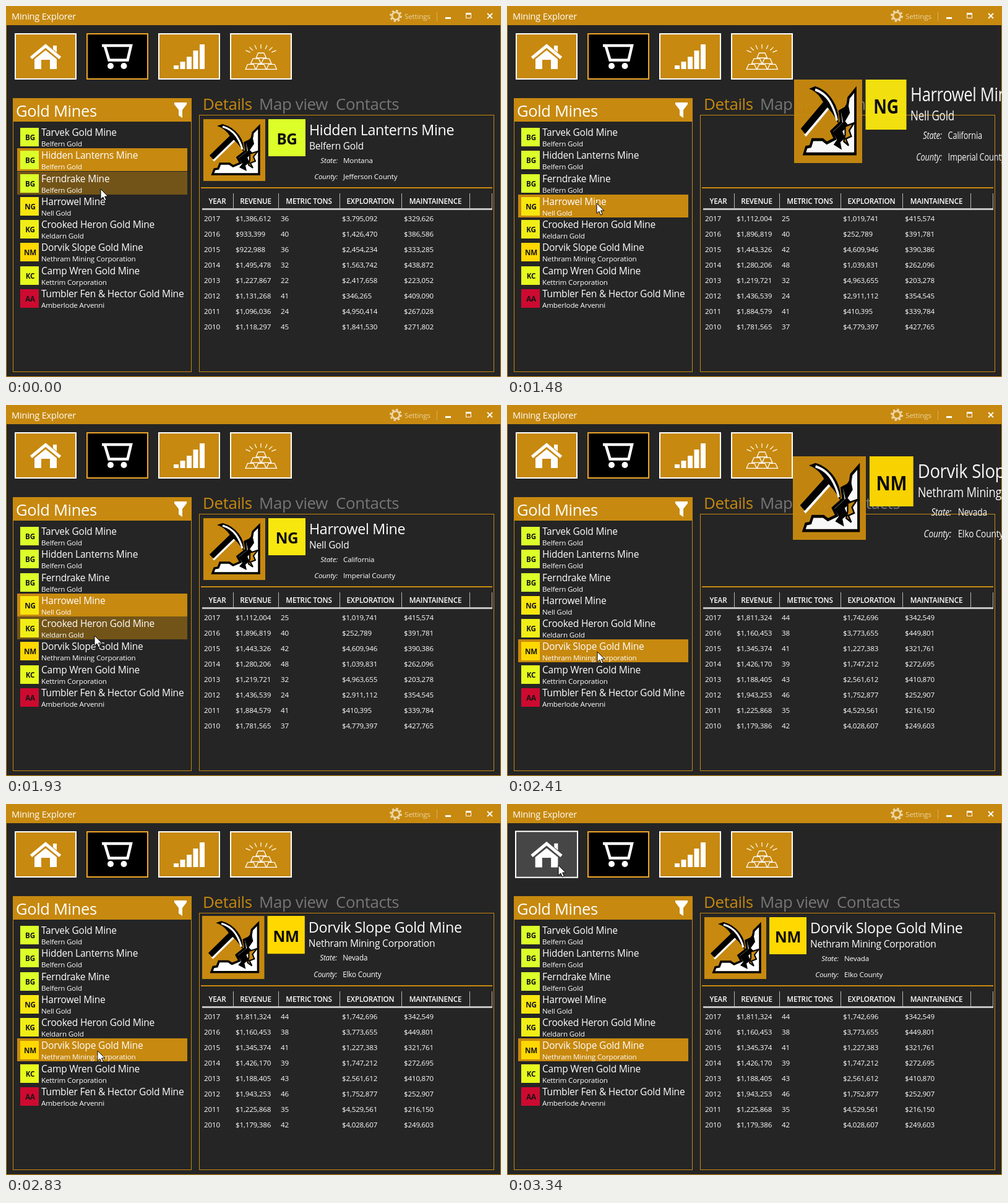
Write an HTML page that moves like this. It is 800 px wide and 600 px high and loops after 5340 ms.

```html
<!DOCTYPE html>
<html lang="en">
<head>
<meta charset="utf-8">
<title>Mining Explorer</title>
<style>
html, body { margin: 0; width: 100%; height: 100%; overflow: hidden; background: #252525; }
svg { display: block; width: 800px; height: 600px; }
text { font-family: "Open Sans", "Noto Sans", sans-serif; letter-spacing: -.014em; fill: #fff; white-space: pre; }
</style>
</head>
<body>
<svg id="stage" viewBox="0 0 800 600" xmlns="http://www.w3.org/2000/svg"></svg>
<script>
const NS = 'http://www.w3.org/2000/svg';
const stage = document.getElementById('stage');
const GOLD = '#c7890f', HOVER = '#735418', WHITE = '#fff', DARK = '#252525';
const LOOP = 5340, STEP = 30, MOVE_START = 1000, MOVE_END = 3340;
const ROW_TOP = 193, ROW_H = 37.25;

function el(parent, tag, attrs) {
  const node = document.createElementNS(NS, tag);
  for (const key in attrs) node.setAttribute(key, attrs[key]);
  return parent.appendChild(node);
}
const group = parent => el(parent, 'g', {});
const rect = (parent, x, y, width, height, fill, more) =>
  el(parent, 'rect', { x, y, width, height, fill, ...more });
const path = (parent, d, fill, more) => el(parent, 'path', { d, fill, ...more });
const line = (parent, d, stroke, width, more) =>
  path(parent, d, 'none', { stroke, 'stroke-width': width, ...more });
// Small text is set a little heavier to stay crisp
function label(parent, x, y, size, str, more) {
  const node = el(parent, 'text', { x, y, 'font-size': size * .97,
    'font-weight': size <= 12 ? 500 : 400, ...more });
  node.textContent = str;
  return node;
}
const MID = { 'text-anchor': 'middle' };

const firms = {
  BG: ['Belfern Gold', '#dcff2a'],
  NG: ['Nell Gold', '#f8e60f'],
  KG: ['Keldarn Gold', '#f0ee16'],
  NM: ['Nethram Mining Corporation', '#ffd800'],
  KC: ['Kettrim Corporation', '#e7fa1e'],
  AA: ['Amberlode Arvenni', '#cd0a30']
};
const mines = [
  ['Tarvek Gold Mine', 'BG'],
  ['Hidden Lanterns Mine', 'BG'],
  ['Ferndrake Mine', 'BG'],
  ['Harrowel Mine', 'NG'],
  ['Crooked Heron Gold Mine', 'KG'],
  ['Dorvik Slope Gold Mine', 'NM'],
  ['Camp Wren Gold Mine', 'KC'],
  ['Tumbler Fen & Hector Gold Mine', 'AA']
];
const records = {
  1: { state: 'Montana', county: 'Jefferson County', rows: [
    '$1,386,612 36 $3,795,092 $329,626', '$933,399 40 $1,426,470 $386,586',
    '$922,988 36 $2,454,234 $333,285', '$1,495,478 32 $1,563,742 $438,872',
    '$1,227,867 22 $2,417,658 $223,052', '$1,131,268 41 $346,265 $409,090',
    '$1,096,036 24 $4,950,414 $267,028', '$1,118,297 45 $1,841,530 $271,802'] },
  3: { state: 'California', county: 'Imperial County', rows: [
    '$1,112,004 25 $1,019,741 $415,574', '$1,896,819 40 $252,789 $391,781',
    '$1,443,326 42 $4,609,946 $390,386', '$1,280,206 48 $1,039,831 $262,096',
    '$1,219,721 32 $4,963,655 $203,278', '$1,436,539 24 $2,911,112 $354,545',
    '$1,884,579 41 $410,395 $339,784', '$1,781,565 37 $4,779,397 $427,765'] },
  5: { state: 'Nevada', county: 'Elko County', rows: [
    '$1,811,324 44 $1,742,696 $342,549', '$1,160,453 38 $3,773,655 $449,801',
    '$1,345,374 41 $1,227,383 $321,761', '$1,426,170 39 $1,747,212 $272,695',
    '$1,188,405 43 $2,561,612 $410,870', '$1,943,253 46 $1,752,877 $252,907',
    '$1,225,868 35 $4,529,561 $216,150', '$1,179,386 42 $4,028,607 $249,603'] }
};

// Time, x, y of the pointer tip
const pointerKeys = [
  [0, 153, 296], [970, 153, 296], [1000, 152, 298], [1480, 145, 319], [1930, 143, 373],
  [2410, 146, 399], [2830, 148, 399], [2980, 147, 446], [3130, 125, 300], [3340, 83, 99]
];
// Time, left, top, x scale, y scale, opacity of the sliding summary
const slideKeys = [
  [-60, 470, 8, 1.3, 1.38, .95], [0, 462, 83, 1.18, 1.35, .97], [40, 464, 119, 1.1, 1.35, .97],
  [100, 425, 133, 1.07, 1.27, .98], [210, 347, 157, 1.03, 1.15, 1],
  [420, 317, 181, 1.005, 1.02, 1], [480, 319, 183, 1, 1, 1]
];
// When a mine is picked, and the zero time of its slide
const picks = [
  { at: 0, mine: 1, zero: -1000 },
  { at: 1480, mine: 3, zero: 1440 },
  { at: 2350, mine: 5, zero: 2410 }
];

function sample(keys, t) {
  if (t <= keys[0][0]) return keys[0].slice(1);
  for (let i = 1; i < keys.length; i++) {
    const a = keys[i - 1], b = keys[i];
    if (t <= b[0]) {
      const k = (t - a[0]) / (b[0] - a[0]);
      return a.slice(1).map((v, j) => v + (b[j + 1] - v) * k);
    }
  }
  return keys[keys.length - 1].slice(1);
}

function drawWindow() {
  rect(stage, 0, 0, 800, 600, DARK);
  rect(stage, .5, .5, 799, 599, 'none', { stroke: GOLD });
  rect(stage, 0, 0, 800, 31, GOLD);
  label(stage, 9, 22, 15, 'Mining Explorer');
  const pale = '#ecd5a5';
  el(stage, 'circle', { cx: 630, cy: 16, r: 6, fill: 'none', stroke: pale, 'stroke-width': 3 });
  el(stage, 'circle', { cx: 630, cy: 16, r: 8.5, fill: 'none', stroke: pale,
    'stroke-width': 3, 'stroke-dasharray': '3.34 3.34' });
  label(stage, 644, 21, 12, 'Settings', { style: 'fill:' + pale });
  line(stage, 'M696.5 9V24', '#dcae5a', 1);
  rect(stage, 710, 18, 9, 3, WHITE);
  line(stage, 'M743.5 12V19.5H751.5V12', WHITE, 1);
  rect(stage, 743, 11, 9, 3, WHITE);
  line(stage, 'M778 12L786 20M786 12L778 20', WHITE, 1.8);
}

function tile(x, fill, stroke) {
  const g = group(stage);
  const box = rect(g, x + 1, 45, 98, 73, fill, { stroke, 'stroke-width': 2 });
  return { g, box };
}

function drawTiles() {
  const home = tile(14, GOLD, WHITE);
  line(home.g, 'M40.5 84L64 64.5L87.5 84', WHITE, 5);
  path(home.g, 'M76 64H82V75L76 70Z', WHITE);
  path(home.g, 'M46 86L64 71.5L82 86V102H46ZM57 87V102H71V87Z', WHITE, { 'fill-rule': 'evenodd' });

  const cart = tile(130, '#000', '#f0a526').g;
  line(cart, 'M155 64H202L196.5 87.5H166.5L159.5 64', WHITE, 4.5);
  for (const cx of [169, 190.5]) el(cart, 'circle', { cx, cy: 97, r: 5, fill: WHITE });

  const chart = tile(246, GOLD, WHITE).g;
  [6, 12, 20, 30, 40].forEach((h, i) => rect(chart, 271 + i * 10.5, 102 - h, 8, h, WHITE));

  const bars = tile(362, GOLD, WHITE).g;
  for (let row = 0; row < 3; row++)
    for (let i = 0; i <= row; i++) {
      const x = 404 + (i * 2 - row) * 8.5, y = 76 + row * 9.2;
      line(bars, `M${x} ${y + 8}L${x + 3.5} ${y}H${x + 13}L${x + 16.5} ${y + 8}Z`, WHITE, 1.3,
        { 'stroke-linejoin': 'round' });
    }
  for (let i = -3; i <= 3; i++) {
    const a = i * .38, s = Math.sin(a), c = Math.cos(a);
    line(bars, `M${412 + s * 19} ${79 - c * 10}L${412 + s * 27} ${79 - c * 17}`, WHITE, 1.2);
  }
  return home;
}

function drawList() {
  rect(stage, 11.5, 149.5, 288, 442, 'none', { stroke: GOLD });
  rect(stage, 11, 149, 289, 38, GOLD);
  label(stage, 16, 179, 26.3, 'Gold Mines');
  path(stage, 'M272 156H292V159L285 168V181L279 177V168L272 159Z', WHITE);
  return mines.map(([name, code], i) => {
    const y = Math.round(ROW_TOP + i * ROW_H);
    const back = rect(stage, 18, y, 275, 37, 'none');
    rect(stage, 23, y + 4, 30, 30, firms[code][1]);
    label(stage, 39, y + 24, 12, code, { ...MID, 'font-weight': 700, style: 'fill:#151515' });
    label(stage, 57, y + 17, 16, name);
    label(stage, 57, y + 34, 12, firms[code][0]);
    return back;
  });
}

function drawFrame() {
  ['Details', 'Map view', 'Contacts'].forEach((name, i) =>
    label(stage, [318, 409, 533][i], 168, 26.67, name, { style: 'fill:' + (i ? '#767676' : GOLD) }));
  rect(stage, 312.5, 176.5, 476, 415, 'none', { stroke: GOLD });
  rect(stage, 315, 293, 471, 2, GOLD);
  const heads = ['YEAR', 'REVENUE', 'METRIC TONS', 'EXPLORATION', 'MAINTAINENCE'];
  heads.forEach((name, i) => label(stage, [341.5, 403.5, 489.5, 589, 694][i], 320, 12, name,
    { ...MID, 'font-weight': 600 }));
  for (const x of [367, 440, 539, 639, 749, 785]) rect(stage, x, 303, 1, 25, '#b9b9b9');
  rect(stage, 317, 327, 469, 3, '#c4c4c4');
}

function drawTable(parent, rows) {
  rows.forEach((row, r) => [String(2017 - r), ...row.split(' ')].forEach((cell, i) =>
    label(parent, [320, 371, 444, 543, 643][i], 348 + r * 25, 12, cell)));
}

function drawPick(g) {
  rect(g, 0, 0, 100, 100, GOLD);
  const ink = { stroke: '#000', 'stroke-width': 3.5 };
  path(g, 'M90 12L80 22L78 33L67 38L69 51L55 62L60 71L48 76L42 72L27 72L24 80L18 81L15 89H90Z', WHITE, ink);
  path(g, 'M79 27L69 39L72 51L57 63L63 72L58 78L70 84L68 75L75 70L71 62L80 55L75 50L82 40Z', '#000');
  path(g, 'M75 56L88 52L81 61L84 68L76 71L80 79L73 74L75 66Z', GOLD, { stroke: '#000', 'stroke-width': 2 });
  line(g, 'M16 67L50 34', WHITE, 4);
  line(g, 'M13 62L47 29', '#000', 9);
  path(g, 'M22 11L31 8Q47 12 57 25Q67 38 65 53Q56 38 45 30L39 22Q32 14 22 11Z', '#000');
  line(g, 'M31 12Q45 16 53 27Q60 37 63 49', WHITE, 3);
}

// Summary parts are placed relative to the corner of the picture
function drawSummary(parent, index) {
  const [name, code] = mines[index], { state, county } = records[index];
  drawPick(parent);
  rect(parent, 105, 0, 60, 60, firms[code][1]);
  label(parent, 135, 41, 25, code, { ...MID, 'font-weight': 700, style: 'fill:#0c0c0c' });
  label(parent, 171, 26, 24, name);
  label(parent, 171, 49, 16, firms[code][0]);
  [['State:', state, 71], ['County:', county, 97]].forEach(([key, value, y]) => {
    label(parent, 217, y, 12, key, { 'text-anchor': 'end', 'font-style': 'italic' });
    label(parent, 226, y, 12, value);
  });
}

drawWindow();
const home = drawTiles();
const backs = drawList();
drawFrame();
for (const pick of picks) {
  pick.table = group(stage);
  drawTable(pick.table, records[pick.mine].rows);
  pick.summary = group(stage);
  drawSummary(pick.summary, pick.mine);
}
const pointer = path(stage, 'M0 0V16.5L3.8 13L6.5 19L9.2 17.8L6.6 12H11.8Z', WHITE,
  { stroke: '#000', 'stroke-width': 1 });

function render(ms) {
  let t = ms % LOOP;
  t = t < MOVE_START ? 0 : Math.min(MOVE_END, MOVE_START + Math.floor((t - MOVE_START) / STEP) * STEP);

  const current = picks.filter(p => p.at <= t).pop();
  for (const p of picks) {
    const display = p === current ? 'inline' : 'none';
    p.table.setAttribute('display', display);
    p.summary.setAttribute('display', display);
  }
  const [x, y, sx, sy, opacity] = sample(slideKeys, t - current.zero);
  current.summary.setAttribute('transform', `translate(${x} ${y}) scale(${sx} ${sy})`);
  current.summary.setAttribute('opacity', opacity);

  const [px, py] = sample(pointerKeys, t);
  pointer.setAttribute('transform', `translate(${px} ${py})`);
  const over = Math.floor((py - ROW_TOP) / ROW_H);
  backs.forEach((back, i) =>
    back.setAttribute('fill', i === current.mine ? GOLD : i === over ? HOVER : 'none'));

  const onHome = px > 14 && px < 114 && py > 44 && py < 119;
  home.box.setAttribute('fill', onHome ? '#464646' : GOLD);
  home.g.setAttribute('transform', onHome
    ? 'translate(64 81.5) scale(1.02) translate(-64 -81.5)' : '');
}

const start = performance.now();
function tick() {
  render(performance.now() - start);
  requestAnimationFrame(tick);
}
render(0);
requestAnimationFrame(tick);
</script>
</body>
</html>
```
